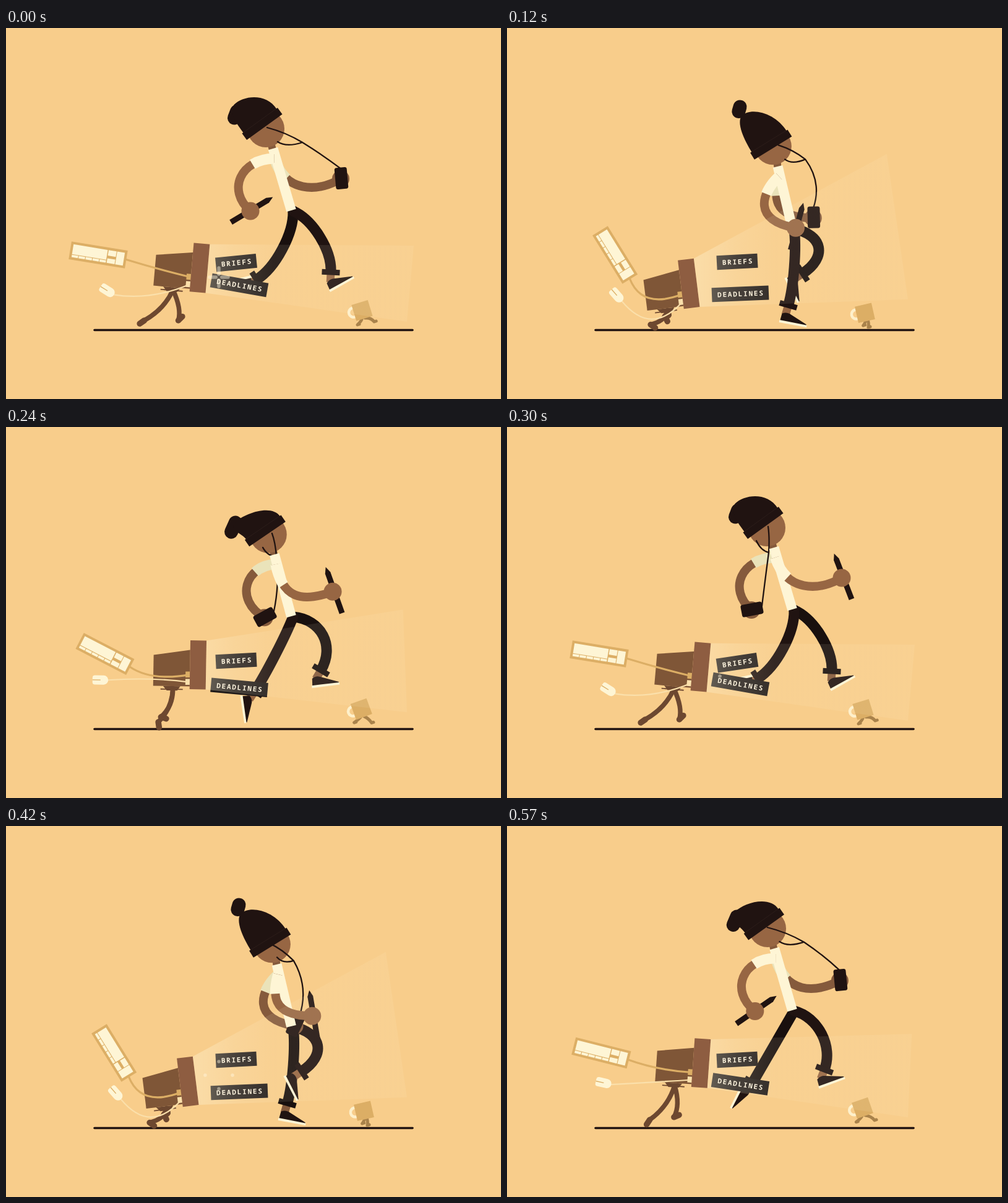
These frames come from a looping animation (800x600 px, 600 ms). An HTML page:

```html
<!DOCTYPE html>
<html lang="en">
<head>
<meta charset="utf-8">
<title>Chased by work</title>
<style>
html, body { margin: 0; width: 100%; height: 100%; overflow: hidden; background: #f8cd8b; }
svg { display: block; width: 100%; height: 100%; }
text { font: 700 11px "Noto Sans Mono", "DejaVu Sans Mono", monospace; letter-spacing: 1.8px; }
</style>
</head>
<body>
<svg viewBox="0 0 800 600">
  <defs>
    <linearGradient id="light" gradientUnits="userSpaceOnUse" x1="310" y1="0" x2="650" y2="0">
      <stop offset="0" stop-color="#fff6d8" stop-opacity=".36"/>
      <stop offset=".18" stop-color="#fff6d8" stop-opacity=".18"/>
      <stop offset=".36" stop-color="#fff6d8" stop-opacity=".09"/>
      <stop offset="1" stop-color="#fff6d8" stop-opacity=".09"/>
    </linearGradient>
  </defs>
  <path d="M143 488.5H657" stroke="#211311" stroke-width="3.5" stroke-linecap="round"/>
  <g id="scene"></g>
</svg>
<script>
const LOOP = 600, STEP = 30;
const INK = '#201311', CREAM = '#fef5d5', TAN = '#dcae65', SKIN = '#976643', SHADE = '#855a3c', STUB = '#6d4830';
const ROUND = 'stroke-linecap="round" stroke-linejoin="round"';
const scene = document.getElementById('scene');

// Stride key poses: phase, cuff x, cuff y, knee bend, foot angle
const STRIDE = [
  [0, 525, 395, 20, -29],
  [.1, 487, 449, 0, -6],
  [.3, 427, 447, 13, 32],
  [.45, 397, 415, 0, 117],
  [.5, 405, 407, 18, 167],
  [.6, 443, 403, 33, 106],
  [.8, 502, 393, 50, 27],
  [.95, 513, 394, 30, -20]
];

// Periodic motion: mean value plus the first harmonics.
function wave(p, mean, cos1 = 0, sin1 = 0, cos2 = 0, cos3 = 0) {
  const a = 2 * Math.PI * p;
  return mean + cos1 * Math.cos(a) + sin1 * Math.sin(a) + cos2 * Math.cos(2 * a) + cos3 * Math.cos(3 * a);
}

// Smooth periodic interpolation without overshoot.
function pose(rows, phase) {
  const n = rows.length, p = phase % 1;
  const row = i => rows[(i + n) % n];
  const time = i => row(i)[0] + Math.floor(i / n);
  let i = n - 1;
  while (rows[i][0] > p + 1e-9) i--;
  const h = time(i + 1) - time(i), s = (p - time(i)) / h;
  const slope = (j, k) => (row(j + 1)[k] - row(j)[k]) / (time(j + 1) - time(j));
  const tangent = (j, k) => {
    const a = slope(j - 1, k), b = slope(j, k);
    return a * b > 0 ? 2 * a * b / (a + b) : 0;
  };
  return rows[i].slice(1).map((v, j) => {
    const k = j + 1, w = row(i + 1)[k];
    return v + (w - v) * s * s * (3 - 2 * s)
      + h * s * (1 - s) * (tangent(i, k) * (1 - s) - tangent(i + 1, k) * s);
  });
}

const add = ([x, y], dx, dy) => [x + dx, y + dy];
const mix = ([ax, ay], [bx, by], f) => [ax + (bx - ax) * f, ay + (by - ay) * f];
const turn = ([ox, oy], deg, x, y) => {
  const a = deg * Math.PI / 180, c = Math.cos(a), s = Math.sin(a);
  return [ox + x * c - y * s, oy + x * s + y * c];
};
const fill = (d, color) => `<path d="${d}" fill="${color}"/>`;
const line = (d, color, width, extra = '') =>
  `<path d="${d}" fill="none" stroke="${color}" stroke-width="${width}" ${extra}/>`;
const disc = ([x, y], r, color) => `<circle cx="${x}" cy="${y}" r="${r}" fill="${color}"/>`;
const box = (x, y, w, h, color, r = 0) =>
  `<rect x="${x}" y="${y}" width="${w}" height="${h}" rx="${r}" fill="${color}"/>`;
const place = ([x, y], deg, content) => `<g transform="translate(${x} ${y}) rotate(${deg})">${content}</g>`;

function leg(phase, hip, color, skin) {
  const [x, y, bend, angle] = pose(STRIDE, phase);
  const cuff = [x, y], dx = x - hip[0], dy = y - hip[1], k = bend / Math.hypot(dx, dy);
  const thigh = add(mix(hip, cuff, .25), dy * k, -dx * k);
  const calf = add(mix(hip, cuff, .75), dy * k, -dx * k);
  const slant = Math.atan2(y - calf[1], x - calf[0]) * 180 / Math.PI - 90;
  const ankle = turn(cuff, slant, 0, 16);
  return line(`M${cuff}L${ankle}`, skin, 13)
    + place(turn(ankle, angle, -8, 14), angle,
      fill('M1 -3L2 -15Q8 -19 14 -17L44 -5V-3Z', INK) + fill('M0 -4H45V-.5L0 0Z', CREAM))
    + disc(hip, 8.5, color)
    + line(`M${hip}C${thigh} ${calf} ${cuff}`, color, 17)
    + place(cuff, slant, box(-14.5, -4.5, 29, 9, color));
}

const handAt = phase => [wave(phase, 475, -68, 3, -7, -5), wave(phase, 295, 26, 0, -25)];

function arm(phase, shoulder, skin, sleeve) {
  const hand = handAt(phase);
  const upper = add(shoulder, wave(phase, -18, -36), wave(phase, 28, -27, 8));
  const lower = add(hand, wave(phase, -56, 0, 0, 17), wave(phase, -6, -28, 3));
  const d = `M${shoulder}C${upper} ${lower} ${hand}`;
  return line(d, skin, 14) + line(d, sleeve, 17, 'pathLength="100" stroke-dasharray="29 200"');
}

// The cap and its bobble trail behind the bounce of the head.
function hat(step, dip, head) {
  const band = add(head, -6 + .1 * dip, -8 + .18 * dip), angle = -36 + .15 * dip;
  const at = (u, v) => turn(band, angle, u, v);
  const tip = add(band, wave(step, -47.5, 2, 2), wave(step, -33, 2, -20));
  const right = at(33, -5), height = wave(step, 27, 0, 6);
  const bobble = `M${wave(step, 374, -1, 3)} ${wave(step, 137, -2, -19)}`
    + `L${wave(step, 370, -1, 6)} ${wave(step, 147.5, -2, -24)}`;
  return line(bobble, INK, 22, ROUND)
    + fill(`M${at(-33, -5)}C${at(-33, -20)} ${add(tip, -9, 15)} ${tip}`
      + `C${add(tip, 15, -15)} ${add(right, -.62 * height, -height)} ${right}Z`, INK)
    + place(band, angle, box(-35.5, -6.5, 71, 13, INK) + line('M-33 -6.5H33', '#33231f', .6));
}

function wires(p, dip, head, phone) {
  const ear = add(head, wave(p, 2, 0, 7), -2);
  const chin = add(head, wave(p, 8, 18, 0, -7), 21);
  const joint = add(head, wave(p, 38, 28, 0, -7), wave(p, 27, -9, 0, 4));
  const sag = add(mix(joint, phone, .5), .7 * dip, -2);
  return line(`M${ear}Q${add(mix(ear, joint, .5), 2, -4)} ${joint}Q${sag} ${phone}`
    + `M${chin}Q${add(mix(chin, joint, .35), 0, 9)} ${joint}`, INK, 2.3, ROUND);
}

function runner(p) {
  const dip = wave(2 * p, 16, -16);
  const collar = [431.5 + .21 * dip, 195 + dip], waist = [461, 295 + dip];
  const head = [420 + .34 * dip, 163 + .98 * dip];
  const hip = add(waist, 3, 1), shoulder = add(collar, 2, 16);
  const near = handAt(p), far = handAt(p + .5), phone = add(far, 1, -1);
  const penAngle = wave(p, -80, 40, 0, 9), phoneAngle = wave(p, 23, -42, 0, 14);
  return arm(p + .5, shoulder, SHADE, '#eae3ba')
    + leg(p + .5, hip, '#19100e', SHADE)
    + line(`M${add(head, 6, 15)}L${add(collar, 0, 4)}`, SHADE, 12)
    + disc(head, 30, SKIN)
    + wires(p, dip, head, turn(phone, phoneAngle, 0, -16))
    + hat(2 * p, dip, head)
    + leg(p, hip, INK, SKIN)
    + disc(far, 14, SHADE)
    + place(phone, phoneAngle, box(-10, -17.5, 20, 35, INK, 3.5))
    + line(`M${collar}L${waist}`, CREAM, 16)
    + place(add(near, 2, -2), penAngle, fill('M-39 -4.5H30L40 0L30 4.5H-39Z', INK))
    + arm(p, shoulder, SKIN, CREAM)
    + disc(near, 14.5, SKIN);
}

function stub(phase, hip) {
  const ankle = [wave(phase, 247, 9.5, 0, 4, 18), wave(phase, 473, 0, 7)];
  const toe = turn(ankle, wave(phase, 50, -65, -20, 0, -30), 9, 0);
  return line(`M${hip}Q${add(mix(hip, ankle, .5), 10, 6)} ${ankle}`, STUB, 7.5, ROUND)
    + line(`M${ankle}L${toe}`, STUB, 9.5, ROUND);
}

const monitorAt = step => [[wave(step, 303.7, 9.3, -4), wave(step, 398.5, -10.5, 11)], wave(step, -1.5, 6.5, -.5)];

function keyboard() {
  const smallKeys = [0, 1, 2, 3, 4].map(i => box(-42 + 11.4 * i, 6.5, 10.4, 4, CREAM)).join('');
  return box(-46, -14.5, 92, 29, TAN) + box(-42, -10.5, 56, 16, CREAM) + smallKeys
    + box(15.5, -10.5, 13, 9, CREAM) + box(15.5, 3, 13, 7.5, CREAM) + box(29.5, -10.5, 12.5, 21, CREAM);
}

function computer(p) {
  const step = 2 * p, [center, angle] = monitorAt(step);
  const at = (u, v) => turn(center, angle, u, v);
  const board = [wave(step, 163.5, -14.5, -1), 367], boardAngle = wave(step, 36.2, -26.9, .5);
  const boardSag = [wave(step, 230, 15), wave(step, 425, -35, 3)];
  const mouse = [wave(step, 167, -3, 14), wave(step, 424, 1, 16)], mouseAngle = wave(step, 31, 1, 32);
  const mouseSag = [233, wave(step, 457, -16, 50)];
  return stub(p + .5, at(-40, 39)) + stub(p, at(-40, 39))
    + place(center, angle,
      fill('M-56 35H-28L-33 42H-50Z', STUB) + line('M-60 40H-24', STUB, 1.8)
      + fill('M-72 -15L-13 -24V35H-72Z', '#7f5637'))
    + line(`M${turn(board, boardAngle, 45, 0)}Q${boardSag} ${at(-14, 16)}`, TAN, 3.2)
    + line(`M${turn(mouse, mouseAngle, 12, 0)}Q${mouseSag} ${at(-14, 28)}`, '#fbe0ab', 2.2)
    + place(board, boardAngle, keyboard())
    + place(mouse, mouseAngle,
      fill('M-9 -7.5H5A7.5 7.5 0 0 1 5 7.5H-9Q-13 7.5 -13 3.5V-3.5Q-13 -7.5 -9 -7.5Z', CREAM)
      + line('M-13 0H0', TAN, 1.4))
    + place(center, angle,
      box(-20, 11, 9, 9.5, TAN) + box(-20, 23, 9, 9.5, '#fbe0ab') + box(-13, -39.5, 26, 79, '#8e5d41'));
}

function mug(step) {
  const center = [wave(step, 576.2, -1, 2), wave(step, 458.5, -1.5, 2)];
  const foot = (shift, x, y) => line(
    `M${add(center, shift, 12)}Q${(center[0] + x) / 2 + 4} ${y - 7} ${x} ${y}l3 -1`, '#a9824b', 5, ROUND);
  return foot(0, wave(step, 570, -2, 7), wave(step, 480, 0, 2))
    + foot(5, wave(step, 589, 6.2), wave(step, 480, -5))
    + place(center, wave(step, -16, -1, 4),
      '<circle cx="-14" cy="-1" r="7.5" fill="none" stroke="#fef0cb" stroke-width="4.5"/>'
      + box(-13.5, -13.5, 27.5, 27, TAN));
}

// Each kick of a heel jolts the upper sign; the lower one rocks with the steps.
function signs(p) {
  const step = 2 * p, kick = (p < .5 ? 8 : 16) * Math.max(0, wave(step - .15, 0, 1)) ** 2;
  const sign = (center, angle, width, label) => place(center, angle,
    box(-width / 2, -11.5, width, 23, '#1f1918')
    + `<text x=".9" y="4" text-anchor="middle" fill="#fdf3df">${label}</text>`);
  return sign([372, 378 + .6 * kick], -3 - kick, 66, 'BRIEFS')
    + sign([377, wave(step, 423.7, -7.7)], wave(step, 3.2, 6.8), 92, 'DEADLINES');
}

function sparks(t) {
  const grow = t < 300 ? .5 + t / 133 : (t - 300) / 120;
  if (grow > 1) return '';
  const at = (a, r) => turn([344, 403], a, r, 0);
  const outer = 22 * Math.min(1, grow * 1.35), inner = 22 * grow ** 2.2;
  const rays = [0, 90, 180, 270].map(a => `M${at(a, inner)}L${at(a, outer + .1)}`).join('');
  return line(rays, '#fff6e0', 5.5, ROUND + ' opacity=".45"');
}

function beam(step) {
  const [center, angle] = monitorAt(step);
  const top = [wave(step, 634, 25), wave(step, 270, 82)], bottom = [648, wave(step, 455, 20)];
  return fill(`M${turn(center, angle, 13, -39.5)}L${top}L${bottom}L${turn(center, angle, 13, 39.5)}Z`, 'url(#light)');
}

function draw(now) {
  const t = Math.floor(now % LOOP / STEP) * STEP, p = t / LOOP;
  scene.innerHTML = computer(p) + mug(2 * p) + runner(p) + signs(p) + sparks(t) + beam(2 * p);
}

const start = performance.now();
function tick() {
  draw(performance.now() - start);
  requestAnimationFrame(tick);
}
tick();
</script>
</body>
</html>
```
